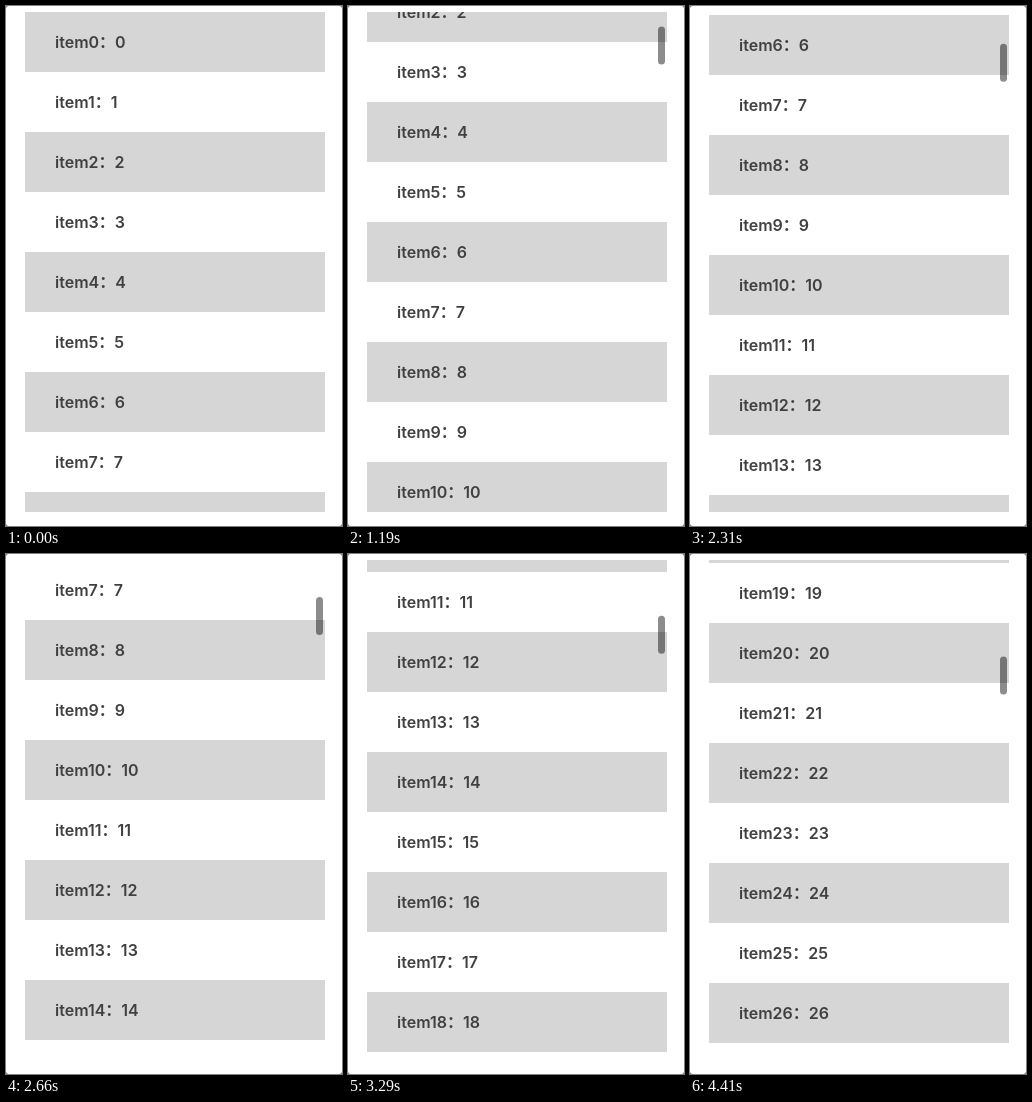
An HTML page that plays this animation: 336 px wide and 520 px high, repeating every 4.48 s.

```html
<!DOCTYPE html>
<html lang="zh-CN">
<head>
<meta charset="utf-8">
<title>Scrolling list</title>
<style>
  html, body { margin: 0; width: 100%; height: 100%; overflow: hidden; background: #777; }
  .window { position: absolute; left: 0; top: 0; width: 336px; height: 520px; border-radius: 3px; background: #fff; }
  .view { position: absolute; left: 19px; top: 6px; width: 300px; height: 500px; overflow: hidden; }
  .item {
    box-sizing: border-box; height: 60px; padding-left: 30px; white-space: nowrap;
    font: 600 16px/60px Inter, "Noto Sans CJK SC", "Noto Sans CJK", sans-serif; color: #404040;
  }
  .item:nth-child(odd) { background: #d6d6d6; }
  .bar {
    position: absolute; left: 291px; top: 1.6px; width: 7px; height: 38px;
    border-radius: 3.5px; background: rgba(0, 0, 0, .45);
  }
</style>
</head>
<body>
<div class="window">
  <div class="view">
    <div id="list"></div>
    <div class="bar" id="bar"></div>
  </div>
</div>
<script>
  const LOOP = 4480, STEP = 70, BAR_RATIO = 0.0831;
  const list = document.getElementById('list');
  const bar = document.getElementById('bar');

  for (let i = 0; i < 100; i++) {
    const item = document.createElement('div');
    item.className = 'item';
    item.textContent = `item${i}:${i}`.replace(':', '\uff1a');
    list.append(item);
  }

  // [time in ms, scroll offset in px]
  const path = [
    [350, 0], [1190, 150], [1820, 282], [2660, 420], [3290, 648],
    [3990, 799], [4270, 1094], [4340, 1121], [4410, 1137]
  ];
  const rates = path.slice(1).map(([t, y], i) => (y - path[i][1]) / (t - path[i][0]));
  // Harmonic means keep the curve monotone.
  const slopes = path.map((_, i) => {
    const a = rates[i - 1] ?? rates[0];
    const b = rates[i] ?? rates[i - 1];
    return 2 * a * b / (a + b);
  });

  function scrollAt(t) {
    if (t <= path[0][0]) return 0;
    let i = 0;
    while (i < path.length - 2 && t > path[i + 1][0]) i++;
    const [t0, y0] = path[i], [t1, y1] = path[i + 1];
    const h = t1 - t0, u = Math.min(1, (t - t0) / h), v = 1 - u;
    return y0 * v * v * (1 + 2 * u) + y1 * u * u * (3 - 2 * u)
      + h * u * v * (slopes[i] * v - slopes[i + 1] * u);
  }

  function draw(now) {
    const t = Math.floor(now % LOOP / STEP) * STEP;
    const y = Math.round(scrollAt(t));
    list.style.transform = `translateY(${-y}px)`;
    bar.style.transform = `translateY(${y * BAR_RATIO}px)`;
    bar.style.visibility = y > 0 ? 'visible' : 'hidden';
  }

  const start = performance.now();
  function tick() {
    draw(performance.now() - start);
    requestAnimationFrame(tick);
  }
  tick();
</script>
</body>
</html>
```
